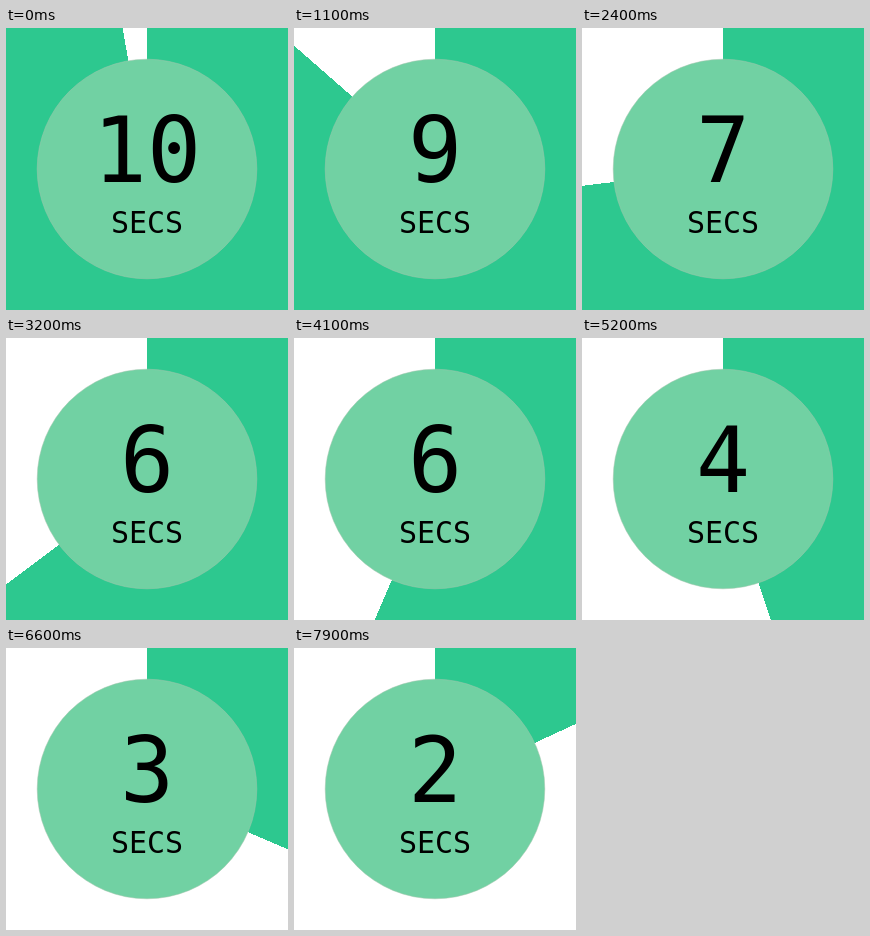
Write an HTML page without scripts that moves like this. It is 282 by 282 pixels and loops after 8 s.

```html
<!DOCTYPE html>
<html lang="en">
<head>
<meta charset="utf-8">
<title>Countdown</title>
<style>
  @property --turn { syntax: "<angle>"; inherits: false; initial-value: 9.8deg; }
  @property --tick { syntax: "<angle>"; inherits: false; initial-value: 0deg; }

  html, body {
    margin: 0;
    width: 100%;
    height: 100%;
    overflow: hidden;
    background: #fff;
  }

  /* The green sector shrinks counter-clockwise towards twelve o'clock */
  .pie {
    width: 282px;
    height: 282px;
    background: conic-gradient(#2dc88f calc(360deg - var(--turn) - var(--tick)), #fff 0);
    animation: turn 8s steps(16) infinite, tick .5s step-end infinite;
  }

  svg { display: block; overflow: hidden; }
  text { font-family: "DejaVu Sans Mono", monospace; text-anchor: middle; }
  .count { font-size: 90px; animation: count 8s step-end infinite; }
  .unit { font-size: 30px; }

  @keyframes turn {
    from { --turn: 9.8deg; }
    to { --turn: 297.8deg; }
  }

  /* 3° steps at 12 per second, seen every 100 ms */
  @keyframes tick {
    0% { --tick: 0deg; }
    20% { --tick: 3deg; }
    40% { --tick: 9deg; }
    60% { --tick: 12deg; }
    80%, 100% { --tick: 15deg; }
  }

  /* One number per 300px, changing each second from 200 ms on */
  @keyframes count {
    0% { transform: translateY(0); }
    2.5% { transform: translateY(-300px); }
    15% { transform: translateY(-600px); }
    27.5% { transform: translateY(-900px); }
    40% { transform: translateY(-1200px); }
    52.5% { transform: translateY(-1500px); }
    65% { transform: translateY(-1800px); }
    77.5% { transform: translateY(-2100px); }
    90%, 100% { transform: translateY(-2400px); }
  }
</style>
</head>
<body>
<div class="pie">
  <svg width="282" height="282" viewBox="0 0 282 282">
    <circle cx="141" cy="141" r="109.8" fill="#71d1a3" stroke="#a3c4ad" stroke-width=".5"/>
    <g class="count">
      <text x="141" y="154">10</text>
      <text x="141" y="454">9</text>
      <text x="141" y="754">8</text>
      <text x="141" y="1054">7</text>
      <text x="141" y="1354">6</text>
      <text x="141" y="1654">5</text>
      <text x="141" y="1954">4</text>
      <text x="141" y="2254">3</text>
      <text x="141" y="2554">2</text>
    </g>
    <text class="unit" x="141" y="205">SECS</text>
  </svg>
</div>
</body>
</html>
```
